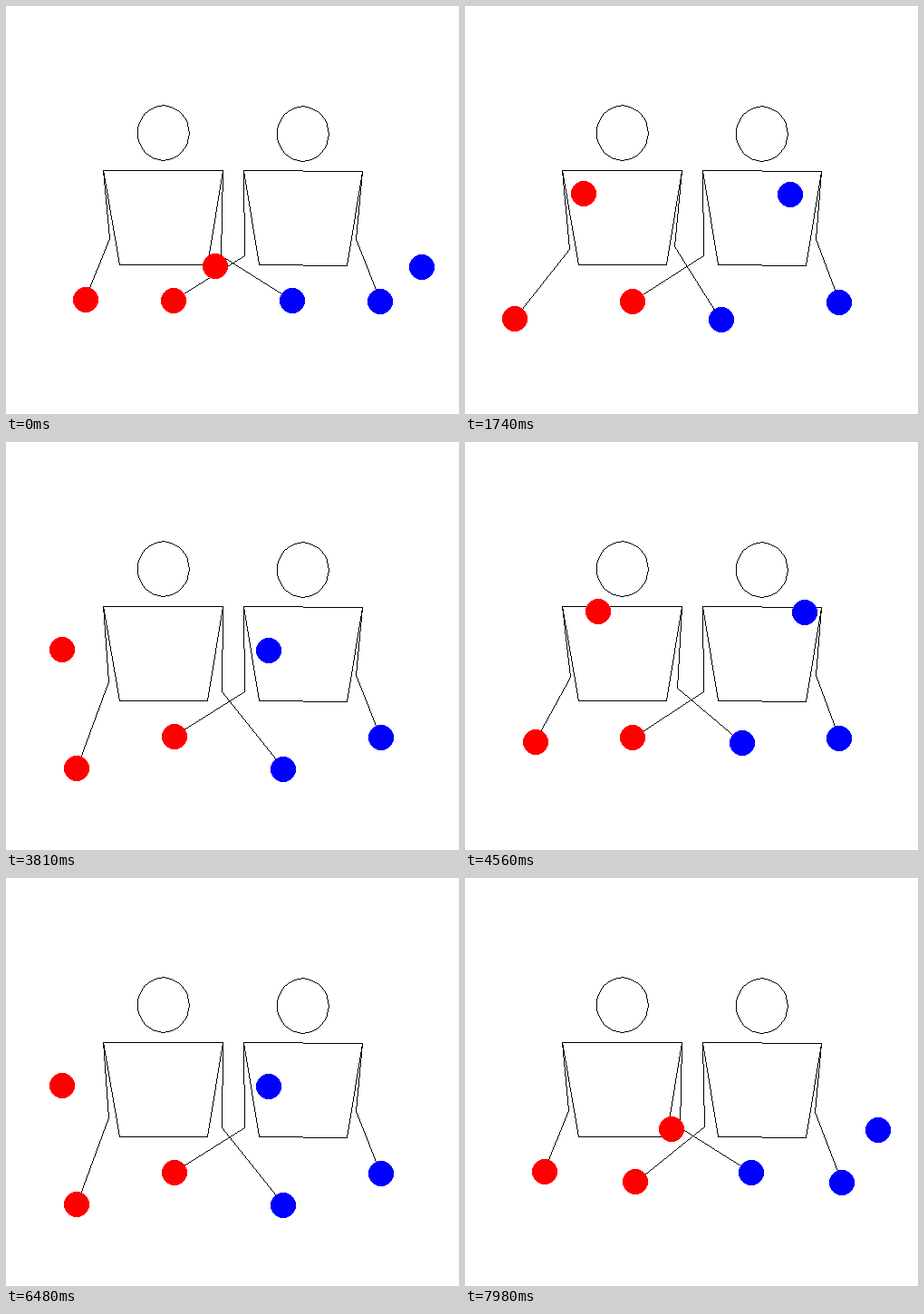
Recreate the animation shown at these times as an HTML page with a canvas. Size 500 px wide and 450 px high, loop 8.01 s.

```html
<!DOCTYPE html>
<html lang="en">
<head>
<meta charset="utf-8">
<title>Two jugglers</title>
<style>
  html, body { margin: 0; width: 100%; height: 100%; overflow: hidden; background: #fff; }
  canvas { display: block; width: 500px; height: 450px; image-rendering: pixelated; }
</style>
</head>
<body>
<canvas id="stage" width="500" height="450"></canvas>
<script>
const ctx = document.getElementById('stage').getContext('2d');

const STEP_MS = 30, PERIOD = 89, HALF = PERIOD / 2;
const VX = 3.23, VY = 12.125, HALF_G = 0.2534;
const FLIGHT = VY / HALF_G, CATCH = FLIGHT - HALF;
const MIRROR = 272.7, TILT = 0.0044, RADIUS = 14;
const BLUE = { x: 228, y: 1 };

// Path of the left hand, measured from its throw: time, x, y, vx, vy
const HAND = [
  [0, 87.5, 324.1, VX, -VY],
  [CATCH, 30.6, 324.1, -2.7, 9.4],
  [22.35, 85, 325.2, 0, 0],
  [44.5, 87.7, 323.9, 0, 0],
  [69.4, 87.7, 326, 0, 0],
  [PERIOD, 87.5, 324.1, VX, -VY]
];

const TORSOS = [
  [[107, 181], [239, 181], [222, 285], [125, 285]],
  [[262, 181], [393, 182], [376, 286], [279, 285]]
];
const HEADS = [[173.2, 139.5], [327.2, 140.5]];

function hermite(a, b, va, vb, span, s) {
  const r = 1 - s;
  return a + (b - a) * s * s * (3 - 2 * s) + span * (va * s * r * r - vb * s * s * r);
}

function handAt(phase) {
  const i = HAND.findIndex((k, n) => n > 0 && phase < k[0]);
  const a = HAND[i - 1], b = HAND[i], span = b[0] - a[0];
  const s = (phase - a[0]) / span;
  return {
    x: hermite(a[1], b[1], a[3], b[3], span, s),
    y: hermite(a[2], b[2], a[4], b[4], span, s)
  };
}

function flightAt(t) {
  return { x: HAND[0][1] + VX * t, y: HAND[0][2] - VY * t + HALF_G * t * t };
}

function place(p, mirrored) {
  const x = mirrored ? MIRROR - p.x : p.x;
  return { x, y: p.y + (x - 88) * TILT };
}

function shift(p, by) {
  return { x: p.x + by.x, y: p.y + by.y };
}

// Hard-edged one pixel line
function line(x0, y0, x1, y1) {
  [x0, y0, x1, y1] = [x0, y0, x1, y1].map(Math.round);
  const n = Math.max(Math.abs(x1 - x0), Math.abs(y1 - y0), 1);
  for (let i = 0; i <= n; i++) {
    ctx.fillRect(Math.round(x0 + (x1 - x0) * i / n), Math.round(y0 + (y1 - y0) * i / n), 1, 1);
  }
}

function outline(points) {
  points.forEach((p, i) => line(...p, ...points[(i + 1) % points.length]));
}

function head([cx, cy]) {
  outline(Array.from({ length: 40 }, (_, i) => {
    const a = i * Math.PI / 20;
    return [cx + 28.4 * Math.cos(a), cy + 30.2 * Math.sin(a)];
  }));
}

function ball(p, color) {
  const x = Math.round(p.x), y = Math.round(p.y);
  ctx.fillStyle = color;
  for (let row = -RADIUS; row < RADIUS; row++) {
    const w = Math.round(Math.sqrt(RADIUS ** 2 - (row + 0.5) ** 2));
    ctx.fillRect(x - w, y + row, 2 * w, 1);
  }
}

// The elbow hangs as low as it can; the view looks down at a slant
function arm([sx, sy], hand) {
  const KX = 2.87, KY = 1.7, KZ = 2.313, LENGTH = 41, REACH = 30;
  const hx = hand.x - 0.5, hy = hand.y - 0.5; // pixel centre of the ball
  const x = (hx - sx) / KX, y = REACH, z = (hy - sy - KY * REACH) / KZ;
  const flat = Math.hypot(x, y), d = Math.hypot(flat, z);
  const bend = Math.sqrt(Math.max(0, LENGTH * LENGTH - d * d / 4));
  const out = 0.5 - bend * z / (d * flat);
  const down = z / 2 + bend * flat / d;
  const ex = sx + KX * x * out, ey = sy + KZ * down + KY * y * out;
  line(sx, sy, ex, ey);
  line(ex, ey, hx, hy);
}

function draw(step) {
  const hands = [], balls = [];
  [false, true].forEach(mirrored => {
    const phase = (step + (mirrored ? 0 : HALF)) % PERIOD;
    const hand = place(handAt(phase), mirrored);
    hands.push(hand);
    if (phase >= CATCH) balls.push(hand);
    if (phase < FLIGHT) balls.push(place(flightAt(phase), mirrored));
  });

  ctx.fillStyle = '#fff';
  ctx.fillRect(0, 0, 500, 450);
  ctx.fillStyle = '#000';
  HEADS.forEach(head);
  TORSOS.forEach(outline);
  // Each person owns one hand of each colour
  TORSOS.forEach((torso, i) => {
    arm(torso[0], hands[i]);
    arm(torso[1], shift(hands[i], BLUE));
  });
  balls.forEach(p => {
    ball(p, '#f00');
    ball(shift(p, BLUE), '#00f');
  });
}

function tick() {
  draw(Math.floor(performance.now() / STEP_MS) % PERIOD);
  requestAnimationFrame(tick);
}
tick();
</script>
</body>
</html>
```
